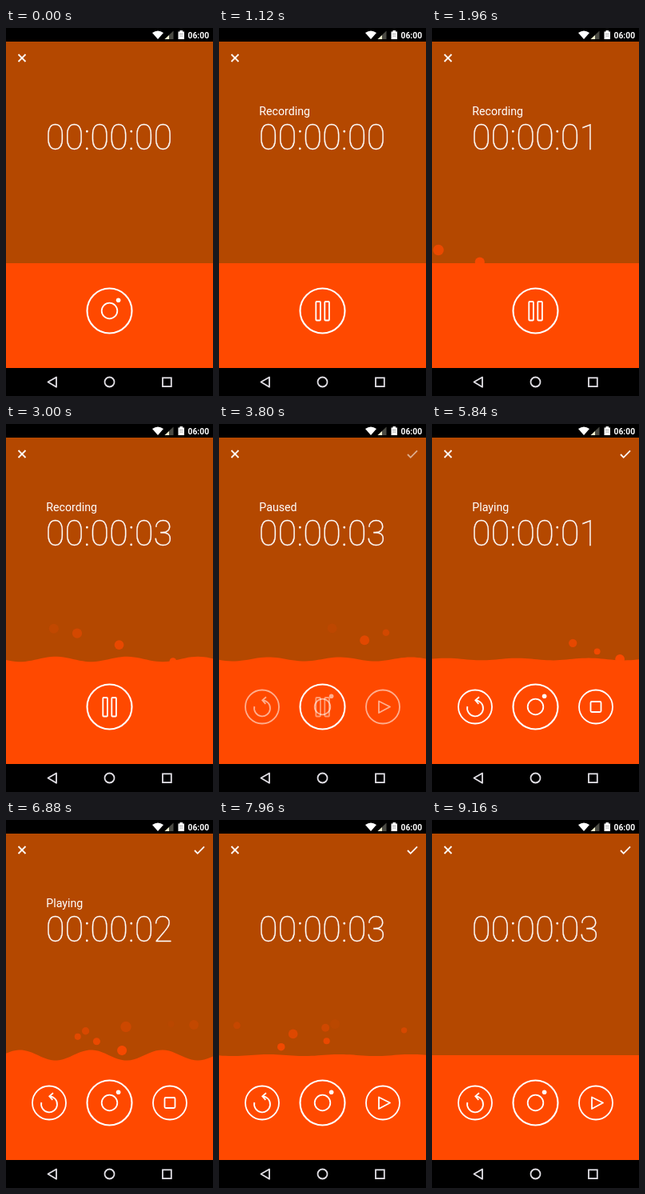
These frames come from a looping animation (259 px wide and 460 px high, 9200 ms). An HTML page:

```html
<!DOCTYPE html>
<html lang="en">
<head>
<meta charset="utf-8">
<title>Voice recorder</title>
<style>
  html, body { margin: 0; width: 100%; height: 100%; overflow: hidden; background: #000; }
  svg { display: block; width: 100%; height: 100%; }
  text { fill: #fff; font-family: Roboto, sans-serif; }
  .line { fill: none; stroke: #fff; stroke-width: 1.8; }
  .nav { stroke: #e2e0e6; }
  .glow { fill: #ff4900; }
  #timer { font-size: 43.6px; font-weight: 100; stroke: #fff; stroke-width: .35; }
</style>
</head>
<body>
<svg viewBox="0 0 259 460">
  <rect width="259" height="460"/>
  <rect y="17" width="259" height="408" fill="#b44800"/>
  <g id="bubbles" class="glow"></g>
  <path id="wave" class="glow"/>

  <g id="status">
    <path d="M183 6Q190 1 197 6L190 14Z" fill="#fff"/>
    <path d="M209.5 3.5V14H198.5Z" fill="#4b4b44"/>
    <path d="M204 9V14H198.5Z" fill="#f3f3d2"/>
    <path d="M215.5 4.5H217.5V3H221V4.5H223V14H215.5Z" fill="#fff"/>
    <path d="M217 7.5H221.5M217 10H221.5" stroke="#aaa"/>
    <text x="227.5" y="12.5" font-size="10.3" font-weight="700">06:00</text>
  </g>

  <path class="line" d="M15.5 33L24.5 42M24.5 33L15.5 42"/>
  <path id="check" class="line" d="M236 38L239.7 41.8L248 33.3"/>

  <text id="label" x="50.3" y="109" font-size="14.2"></text>
  <text id="timer" x="49.7" y="152.4"></text>

  <g class="line">
    <circle cx="129.5" cy="353.5" r="28" stroke-width="2.1"/>
    <g id="record">
      <circle cx="129.5" cy="353.5" r="9.8"/>
      <circle cx="140.6" cy="340.3" r="2.8" fill="#fff" stroke="none"/>
    </g>
    <g id="pause">
      <rect x="121.3" y="342" width="5.6" height="23.5" rx="1"/>
      <rect x="132.3" y="342" width="5.6" height="23.5" rx="1"/>
    </g>
    <g id="sides">
      <circle cx="54" cy="353.5" r="21"/>
      <path d="M44.3 353A10 10 0 1 0 54.5 345.3M59 341.3L54.3 345.3L58.3 349.8"/>
      <circle cx="205" cy="353.5" r="21"/>
      <path id="play" d="M200 346.5L214 353.5L200 361Z" stroke-linejoin="round"/>
      <rect id="stop" x="198.5" y="347" width="13" height="13" rx="1.5"/>
    </g>
  </g>

  <g class="line nav">
    <path d="M52.5 442.5L63 436.5V448.8Z" stroke-linejoin="round"/>
    <circle cx="129.5" cy="442.5" r="6"/>
    <rect x="196" y="437.3" width="10.8" height="10.8"/>
  </g>
</svg>
<script>
const LOOP = 9200, TICK = 740, FADE = 200;
const RECORD = 740, PAUSE = 3690, PLAY = 4900, STOP = 7640;
const SURFACE = 294, WAVELENGTH = 89, SWING = 840, LOUDEST = 3000;
const BUBBLE_LIFE = 1400, BUBBLE_START = 305, BUBBLE_RISE = 50;

const $ = id => document.getElementById(id);
const clamp = v => Math.max(0, Math.min(1, v));
const fadeIn = (t, start) => clamp((t - start) / FADE);
const during = (t, start, end) => fadeIn(t, start) * (1 - fadeIn(t, end));
const swell = (t, peak, width) => Math.exp(-(((t - peak) / width) ** 2));
const show = (id, alpha) => $(id).setAttribute("opacity", alpha);

let seed = 7;
const random = () => (seed = seed * 16807 % 2147483647) / 2147483647;

const bubbles = [];
function addBubbles(start, end, gap) {
  for (let born = start; born < end; born += gap * (0.6 + 0.8 * random())) {
    const node = document.createElementNS("http://www.w3.org/2000/svg", "circle");
    node.setAttribute("cx", 8 + 246 * random());
    node.setAttribute("r", 3.5 + 3.5 * random());
    $("bubbles").append(node);
    bubbles.push({ node, born });
  }
}
addBubbles(1500, 3200, 330);
addBubbles(5300, STOP, 160);

// A standing wave that swells with the sound.
function wavePath(t) {
  const level = 3.3 * swell(t, 3200, 1250) + 9 * swell(t, 6850, 800);
  const height = level * Math.cos(2 * Math.PI * (t - LOUDEST) / SWING);
  let d = "M0 425";
  for (let x = 0; x <= 260; x += 4) {
    const y = SURFACE - height * Math.cos(2 * Math.PI * (x - 62) / WAVELENGTH);
    d += `L${x} ${y.toFixed(2)}`;
  }
  return d + "V425Z";
}

function secondsAt(t) {
  const start = t < PLAY ? RECORD : PLAY;
  return Math.max(0, Math.min(3, Math.floor((t - start) / TICK)));
}

function labelAt(t) {
  if (t < RECORD || t >= STOP) return "";
  return t < PAUSE ? "Recording" : t < PLAY ? "Paused" : "Playing";
}

function drawBubble({ node, born }, t) {
  const p = (t - born) / BUBBLE_LIFE;
  const alive = p >= 0 && p < 1;
  const rise = BUBBLE_RISE * (1 - (1 - clamp(p)) ** 2);
  node.setAttribute("opacity", alive ? Math.min(1, 1.05 - p) : 0);
  node.setAttribute("cy", BUBBLE_START - rise);
}

function render(t) {
  $("label").textContent = labelAt(t);
  $("timer").textContent = "00:00:0" + secondsAt(t);
  $("wave").setAttribute("d", wavePath(t));

  const pause = during(t, RECORD, PAUSE), stop = during(t, PLAY, STOP);
  show("pause", pause);
  show("record", 1 - pause);
  show("stop", stop);
  show("play", 1 - stop);
  show("sides", fadeIn(t, PAUSE));
  show("check", fadeIn(t, PAUSE));
  bubbles.forEach(bubble => drawBubble(bubble, t));
}

const began = performance.now();
function frame() {
  render((performance.now() - began) % LOOP);
  requestAnimationFrame(frame);
}
frame();
</script>
</body>
</html>
```
